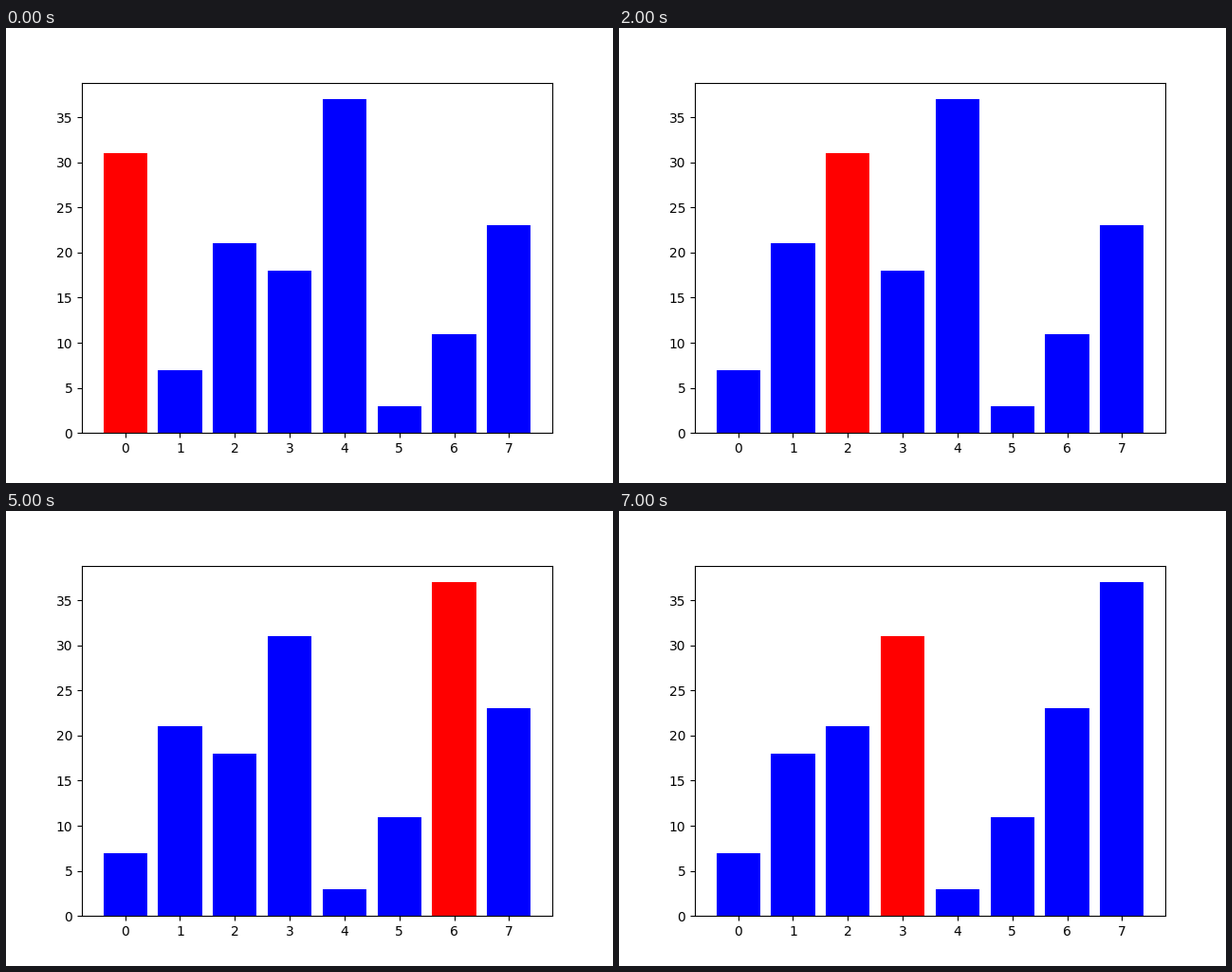
These frames come from a looping animation (640 px wide and 480 px high, 8000 ms). A matplotlib script:

```python
from itertools import islice

import matplotlib.pyplot as plt
from matplotlib.animation import FuncAnimation

VALUES = [31, 7, 21, 18, 37, 3, 11, 23]
STEPS = 8
STEP_MS = 1000


def bubble_swaps(values):
    """Yield the list and the index of the larger item before each swap."""
    a = list(values)
    for end in range(len(a) - 1, 0, -1):
        for j in range(end):
            if a[j] > a[j + 1]:
                yield a[:], j
                a[j], a[j + 1] = a[j + 1], a[j]


states = list(islice(bubble_swaps(VALUES), STEPS))

fig, ax = plt.subplots(figsize=(6.4, 4.8), dpi=100)
bars = ax.bar(range(len(VALUES)), VALUES, color="blue")
ax.set_xticks(range(len(VALUES)))
ax.set_ylim(0, max(VALUES) * 1.05)


def update(step):
    heights, active = states[step]
    for i, (bar, height) in enumerate(zip(bars, heights)):
        bar.set_height(height)
        bar.set_color("red" if i == active else "blue")
        bar.set_linewidth(0)
    return list(bars)


def init():
    return update(0)


anim = FuncAnimation(fig, update, frames=STEPS, init_func=init,
                     interval=STEP_MS, repeat=True, repeat_delay=0)
plt.show()
```
